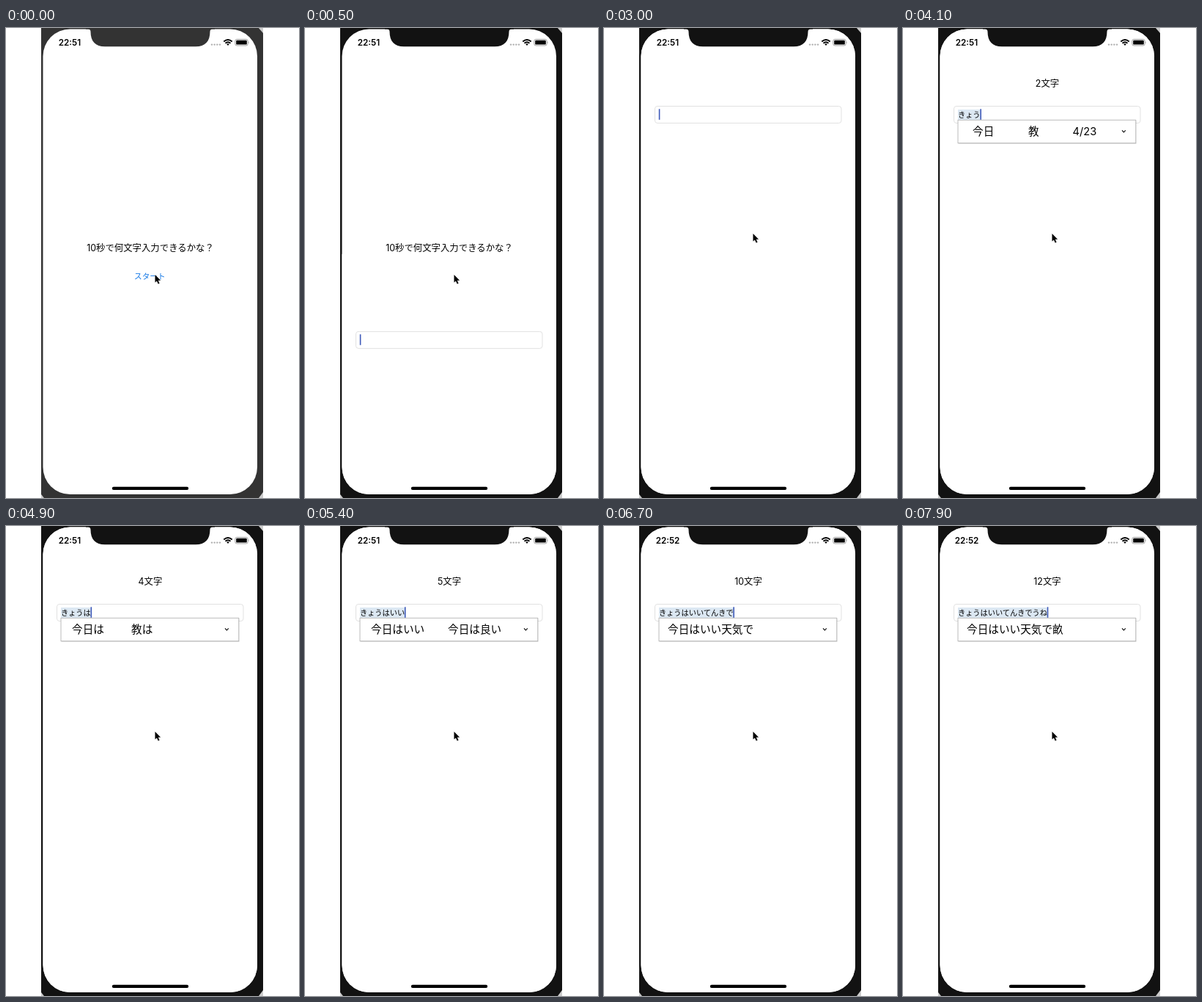
An HTML page that plays this animation: 400x640 px, repeating every 8000 ms.

```html
<!DOCTYPE html>
<html lang="ja">
<head>
<meta charset="utf-8">
<title>Typing game</title>
<style>
  html, body { margin: 0; width: 100%; height: 100%; overflow: hidden; background: #fff; }
  svg { display: block; width: 400px; height: 640px; }
  text { font-family: Inter, "Noto Sans CJK JP", "Noto Sans CJK", sans-serif; fill: #000; white-space: pre; }
  .mid { text-anchor: middle; }
  .body { font-size: 12.4px; }
  .cand { font-size: 14.65px; }
</style>
</head>
<body>
<svg viewBox="0 0 400 640">
  <defs>
    <clipPath id="screen"><rect x="50.5" y="1.5" width="292.5" height="633.5" rx="37"/></clipPath>
  </defs>

  <path d="M345 0H351V8ZM351 631V640H344ZM48 634V640H53Z" fill="#ccc"/>
  <path class="bezel" d="M48 0H345L351 7V632L345 640H52L48 635Z"/>
  <rect x="50.5" y="1.5" width="292.5" height="633.5" rx="37" fill="#fff"/>

  <g clip-path="url(#screen)">
    <text class="mid body" x="197" y="303.6">10秒で何文字入力できるかな？</text>
    <text class="mid" x="196.3" y="341.6" font-size="10.6" style="fill:#1478e6">スタート</text>

    <g id="sheet">
      <rect x="50" y="1" width="294" height="640" fill="#fff"/>
      <text id="count" class="mid body" x="197" y="80"></text>
      <rect x="69.5" y="106.5" width="254.5" height="23" rx="3.5" fill="#fff" stroke="#dedede" stroke-width=".9"/>
      <rect id="mark" x="75" y="111" width="0" height="14" fill="#dce8f3"/>
      <text id="typed" x="75" y="121.5" font-size="10.2"></text>
      <rect id="caret" x="74.8" y="110.3" width="1.6" height="14.6" fill="#3c58b8"/>
      <g id="panel">
        <rect x="75.5" y="126" width="243" height="32" fill="#000" opacity=".12"/>
        <rect x="75" y="125.3" width="242.8" height="31.4" fill="#fff" stroke="#b4b4b4" stroke-width=".9"/>
        <g id="list"></g>
        <path d="M299 139.4L301.4 141.8L303.8 139.4" fill="none" stroke="#111" stroke-width="1.2"/>
      </g>
    </g>
  </g>

  <path class="bezel" d="M109 0V1.5H112Q115.5 1.5 115.5 5C115.5 18 122 25.3 135 25.3H259C272 25.3 278.5 18 278.5 5Q278.5 1.5 282 1.5H285V0Z"/>

  <text id="clock" class="mid" x="87" y="24" font-size="11.7" font-weight="600"></text>
  <g fill="#b0b0b0">
    <circle cx="281" cy="22.6" r="1.2"/><circle cx="284.7" cy="22.6" r="1.2"/>
    <circle cx="288.3" cy="22.6" r="1.2"/><circle cx="292" cy="22.6" r="1.2"/>
  </g>
  <g fill="none" stroke="#000" stroke-width="1.8">
    <path d="M297.3 18.5Q303 13.4 308.7 18.5M299.5 20.8Q303 17.8 306.5 20.8"/>
    <path d="M301.2 21.9Q303 20.6 304.8 21.9L303 24Z" fill="#000" stroke="none"/>
  </g>
  <rect x="312.8" y="15.4" width="17.4" height="8.6" rx="2.4" fill="none" stroke="#999" stroke-width=".9"/>
  <rect x="314.2" y="16.8" width="14.6" height="5.8" rx="1.2"/>
  <path d="M331 18.2Q332.4 19.7 331 21.2Z" fill="#999"/>
  <rect x="144.8" y="624.8" width="104.4" height="4.2" rx="2.1"/>

  <path id="mouse" d="M0 0V10.6L2.4 8.5L4.2 12.6L6.1 11.8L4.3 7.8H7.6Z" fill="#000" stroke="#fff" stroke-width=".9" paint-order="stroke"/>
</svg>

<script>
const LOOP = 8000, STEP = 100;
const $ = id => document.getElementById(id);
const bezels = document.querySelectorAll('.bezel');

// [time, text in the field]
const strokes = [
  [0, ''], [3300, 'k'], [3600, 'ky'], [3800, 'きょ'], [4000, 'きょう'],
  [4500, 'きょうh'], [4700, 'きょうは'], [5100, 'きょうはい'], [5400, 'きょうはいい'],
  [5700, 'きょうはいいt'], [5900, 'きょうはいいて'], [6000, 'きょうはいいてn'],
  [6200, 'きょうはいいてんk'], [6300, 'きょうはいいてんき'],
  [6600, 'きょうはいいてんきd'], [6700, 'きょうはいいてんきで'],
  [7000, 'きょうはいいてんきでう'], [7300, 'きょうはいいてんきでうn'], [7400, 'きょうはいいてんきでうね']
];

// [time, x, candidate, x, candidate, ...]
const candidates = [
  [0], [3400, 95, 'k', 171, 'K', 232, 'ｋ'], [3700, 95, 'ky', 171, 'KY'],
  [3900, 95, '今日', 171, '巨', 232, '去'], [4100, 95, '今日', 171, '教', 231.5, '4/23'],
  [4600, 90, '今日h', 171, '教h'], [4800, 90, '今日は', 171, '教は'],
  [5200, 90, '今日はい', 195, '京はい'], [5400, 90, '今日はいい', 195, '今日は良い'],
  [5800, 87, '今日はいいt'], [6000, 87, '今日はいいて'], [6100, 87, '今日はいいてn'],
  [6300, 87, '今日はいい点k'], [6400, 87, '今日はいい天気'], [6600, 87, '今日はいい天気d'],
  [6700, 87, '今日はいい天気で'], [7100, 87, '今日はいい天気でう'], [7600, 87, '今日はいい天気で畝']
];

// [time, opacity]
const blink = [
  [0, 1], [1200, 1], [1500, 0], [1700, 0], [2000, 1],
  [2300, 1], [2600, 0], [2800, 0], [3000, 1], [LOOP, 1]
];

const indexAt = (table, t) => table.findLastIndex(row => row[0] <= t);

function lerpAt(table, t) {
  const i = Math.min(indexAt(table, t), table.length - 2);
  const [t0, a] = table[i], [t1, b] = table[i + 1];
  return a + (b - a) * (t - t0) / (t1 - t0);
}

// Critically damped spring, from 1 to 0
function spring(ms, rate) {
  const s = Math.max(0, ms) / 1000 * rate;
  return (1 + s) * Math.exp(-s);
}

function smooth(p) {
  p = Math.min(1, Math.max(0, p));
  return p * p * (3 - 2 * p);
}

function drawCandidates(row) {
  let html = '';
  for (let i = 1; i < row.length; i += 2)
    html += `<text class="cand" x="${row[i]}" y="146">${row[i + 1]}</text>`;
  $('list').innerHTML = html;
  $('panel').style.display = row.length > 1 ? '' : 'none';
}

function render(t) {
  bezels.forEach(b => b.setAttribute('fill', t < 300 ? '#333' : '#121212'));
  const drop = t < 1600 ? 634 * spring(t - 300, 8.65) : 0;
  $('sheet').setAttribute('transform', `translate(0 ${drop})`);
  $('mouse').setAttribute('transform', `translate(203.5 ${336 - 56 * smooth((t - 1200) / 400)})`);
  $('clock').textContent = t < 6000 ? '22:51' : '22:52';

  // The counter lags one keystroke behind
  const i = indexAt(strokes, t);
  $('typed').textContent = strokes[i][1];
  $('count').textContent = i ? strokes[i - 1][1].length + '文字' : '';
  const width = i ? $('typed').getComputedTextLength() : 0;
  $('mark').setAttribute('width', width);
  $('caret').setAttribute('x', 74.8 + width);
  $('caret').setAttribute('opacity', lerpAt(blink, t));
  drawCandidates(candidates[indexAt(candidates, t)]);
}

const start = performance.now();
let shown = -1;
function tick() {
  const t = Math.floor((performance.now() - start) % LOOP / STEP) * STEP;
  if (t !== shown) render(shown = t);
  requestAnimationFrame(tick);
}
tick();
</script>
</body>
</html>
```
